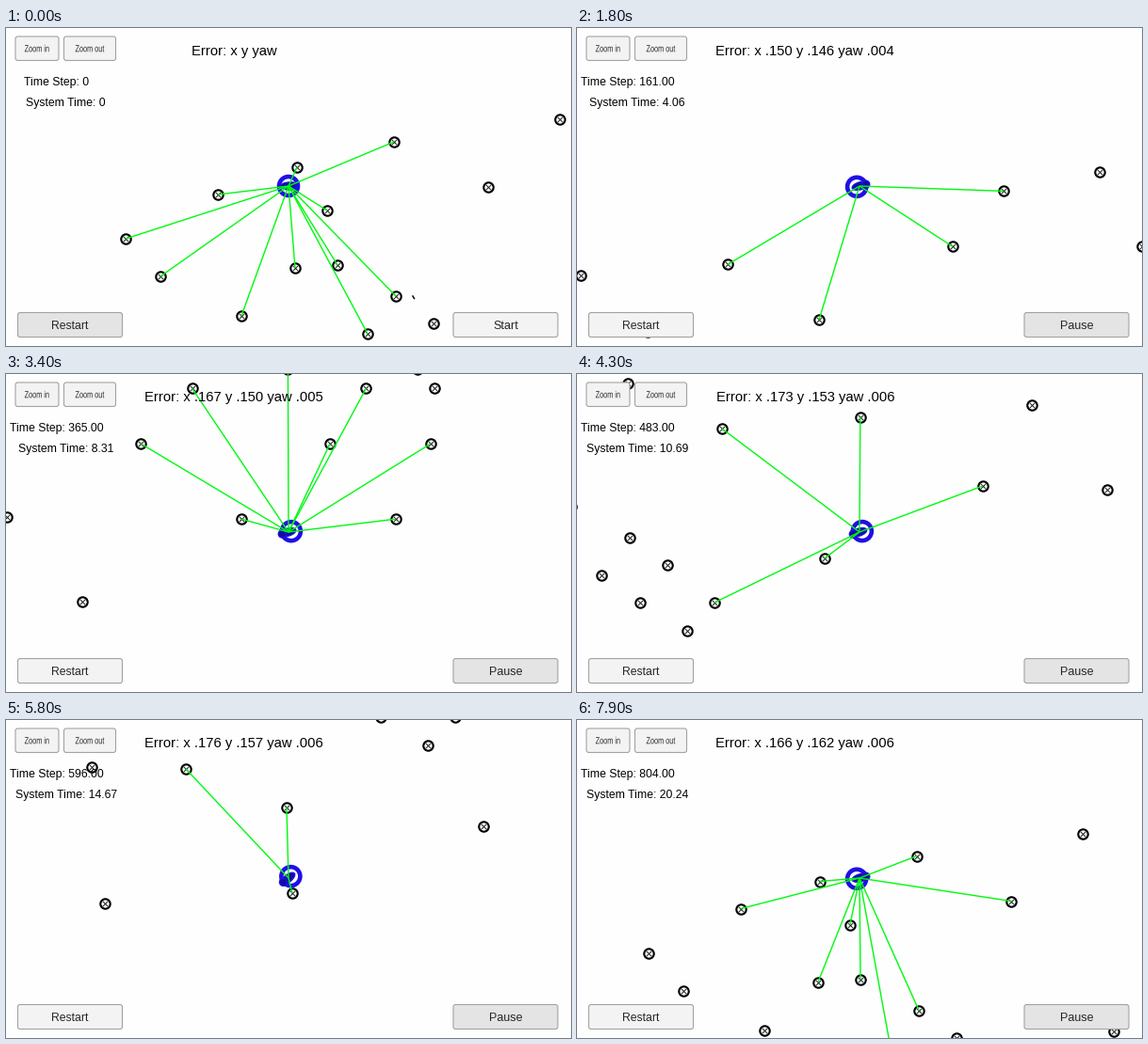
A matplotlib script for the animation above (8000 ms loop, 600x338 px).

```python
import numpy as np
import matplotlib.pyplot as plt
from matplotlib.animation import FuncAnimation
from matplotlib.collections import LineCollection
from matplotlib.patches import Circle, Ellipse, FancyBboxPatch, PathPatch
from matplotlib.textpath import TextPath
from matplotlib.transforms import Affine2D

W, H, DPI = 600, 338, 100
FRAMES, STEP_MS = 80, 100
CENTER = np.array([300, 168])
START, CLOCK_RATE = 0.2686, 2.6525
SPEED, RANGE = 3.6, 187
BLUE, NAVY, GREEN = "#1f10e4", "#120ca0", "#00fa10"
LIGHT, PRESSED = "#f3f3f3", "#e4e4e4"

plt.rcParams["font.family"] = "Liberation Sans"

# Key poses of the drive: time, step, x, y, heading in degrees
KEYS = np.array([
    (START, 0, 300, 168, 0), (1, 63, 456, 131, -10), (2.5, 247, 1235, 0, 30),
    (4.3, 483, 658.2, 279, 162), (5.8, 596, 327, 525, 142),
    (7.1, 748, 181.6, 222, -50), (7.9, 804, 351, 144.5, -15),
])
TIMES, STEPS, POINTS = KEYS[:, 0], KEYS[:, 1], KEYS[:, 2:4]
ANGLES = np.radians(KEYS[:, 4])
SLOPES = SPEED * np.column_stack([np.cos(ANGLES), np.sin(ANGLES)])
SLOPES[0] = 0

# Landmarks around the start and along the way back
HOME = [
    (588, 97), (412, 121), (309, 148), (225, 177), (341, 194), (512, 169),
    (127, 224), (164, 264), (307, 255), (352, 252), (250, 306), (414, 285),
    (384, 325), (454, 314), (621, 307), (659, 157), (744, 85), (425, 354),
    (475, 384), (504, 354), (841, 144), (789, 230), (921, 234),
    (118, 407), (218, 409), (325, 450), (331, 541), (534, 470), (132, 552),
]
# The far end: ever closer together, over four repeating heights
FAR = [(983 + 312 * np.sin(np.pi * i / 18), (66, 7, 146, -13)[i % 4])
       for i in range(10)]
MARKS = np.array(HOME + FAR)


def px(n):
    return n * 72 / DPI


def car_at(step):
    """Position on a cubic Hermite path through the key poses."""
    i = np.clip(np.searchsorted(STEPS, step, side="right") - 1,
                0, len(STEPS) - 2)
    h = STEPS[i + 1] - STEPS[i]
    u = (step - STEPS[i]) / h
    return ((2 * u**3 - 3 * u**2 + 1) * POINTS[i]
            + (u**3 - 2 * u**2 + u) * h * SLOPES[i]
            + (3 * u**2 - 2 * u**3) * POINTS[i + 1]
            + (u**3 - u**2) * h * SLOPES[i + 1])


def heading_at(step):
    d = car_at(step + 0.1) - car_at(step - 0.1)
    return d / max(np.hypot(*d), 1e-9)


def errors(t):
    """Slowly drifting error in x, y and yaw."""
    ex = 0.176 - 0.0018 * (t - 5.6) ** 2
    ey = 0.1415 + 0.0026 * t
    yaw = min(0.006, 0.0033 + 0.0006 * t)
    return [f"{e:.3f}"[1:] for e in (ex, ey, yaw)]


fig = plt.figure(figsize=(W / DPI, H / DPI), dpi=DPI, facecolor="#fefefe")
ax = fig.add_axes([0, 0, 1, 1])
ax.set(xlim=(0, W), ylim=(H, 0))
ax.axis("off")


def label(x, y, s, size=12.2, color="black"):
    return ax.text(x, y, s, size=px(size), color=color, ha="center",
                   va="center_baseline", zorder=9)


def condensed(x, y, s, size=10.3, ratio=0.71):
    path = TextPath((0, 0), s, size=size)
    box = path.get_extents()
    move = (Affine2D().translate(-(box.x0 + box.x1) / 2, 0)
            .scale(ratio, -1).translate(x, y))
    ax.add_patch(PathPatch(move.transform_path(path), fc="#2c2c2c", lw=0,
                           zorder=9))


def button(x, y, w, h):
    patch = FancyBboxPatch((x, y), w, h, fc=LIGHT, ec="#a2a2a2", lw=px(1.1),
                           boxstyle="round,pad=0,rounding_size=2.5", zorder=8)
    return ax.add_patch(patch)


button(10, 9, 46, 25.5)
button(61.5, 9, 55, 25.5)
condensed(32.7, 25.3, "Zoom in")
condensed(89, 25.3, "Zoom out")
restart = button(12.5, 302.5, 111, 26)
toggle = button(475, 302.5, 111, 26)
label(68, 315.5, "Restart", 12.3, "#262626")
toggle_text = label(530.5, 315.5, "Start", 12.5, "#262626")
error_text = label(242.3, 24, "", 14.7)
step_text = label(54, 56.5, "")
clock_text = label(63.7, 78.5, "")

rings, = ax.plot([], [], "o", ms=px(10.4), mfc="white", mec="black",
                 mew=px(2.1), zorder=2)
crosses, = ax.plot([], [], "x", ms=px(6), mec="#222222", mew=px(1), zorder=2)
rays = LineCollection([], colors=GREEN, linewidths=px(1.4), zorder=5)
ax.add_collection(rays)

halo = ax.add_patch(Circle(CENTER, 10, fc="white", ec=BLUE, lw=px(4.6),
                           zorder=3))
body = ax.add_patch(Ellipse(CENTER, 18, 8, fc=NAVY, ec=BLUE, lw=px(1.4),
                            zorder=4))
nose = ax.add_patch(Circle(CENTER, 4, fc=NAVY, ec=BLUE, lw=px(1.4),
                           zorder=4))
pointer, = ax.plot([], [], color="black", lw=px(1.5), zorder=10)


def draw(frame):
    t = frame * STEP_MS / 1000
    running = t > START
    step = np.interp(t, TIMES, STEPS)
    way = heading_at(step) if running else np.array([1.0, 0.0])
    pos = MARKS - car_at(step) + CENTER

    rings.set_data(*pos.T)
    crosses.set_data(*pos.T)
    near = np.hypot(*(pos - CENTER).T) < RANGE
    rays.set_segments([(CENTER, p) for p in pos[near]])

    halo.center = CENTER - way * (3 if running else 0)
    body.set_center(CENTER + way)
    body.angle = np.degrees(np.arctan2(way[1], way[0]))
    nose.center = CENTER + way * (7 if running else 4)

    restart.set_facecolor(LIGHT if running else PRESSED)
    toggle.set_facecolor(PRESSED if running else LIGHT)
    toggle_text.set_text("Pause" if running else "Start")
    if running:
        error_text.set_text("Error: x {} y {} yaw {}".format(*errors(t)))
        step_text.set_text(f"Time Step: {round(step)}.00")
        clock = CLOCK_RATE * (t - START)
        clock_text.set_text(f"System Time: {clock:.2f}")
        pointer.set_data([], [])
    else:
        error_text.set_text("Error: x y yaw")
        step_text.set_text("Time Step: 0")
        clock_text.set_text("System Time: 0")
        u = t / START
        x, y = 432 + 98 * u, 285 + 30 * u
        pointer.set_data([x, x + 1.5], [y, y + 2.5])
    return []


anim = FuncAnimation(fig, draw, frames=FRAMES, interval=STEP_MS, repeat=True,
                     repeat_delay=0, blit=False)
plt.show()
```
